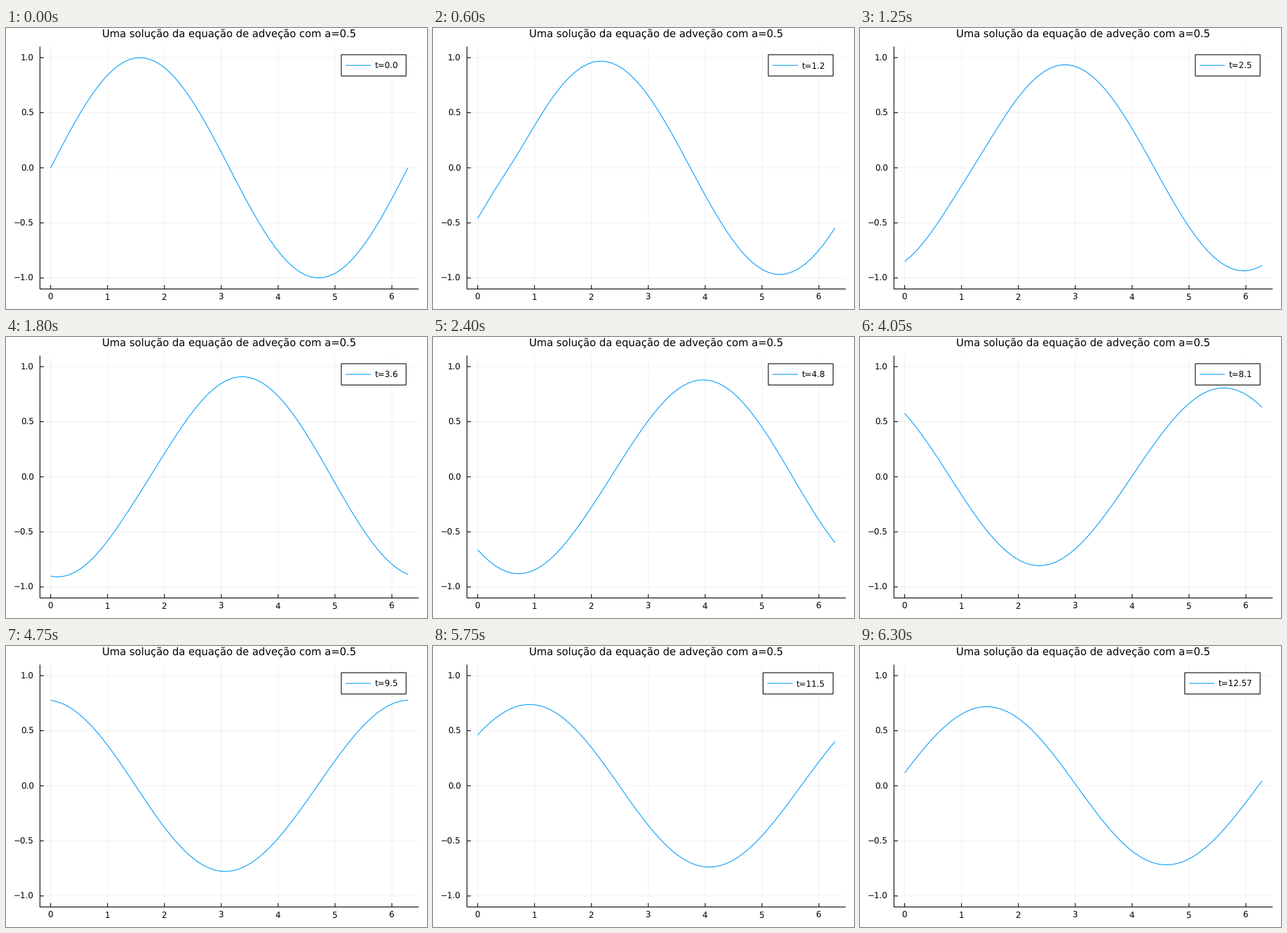
Write a matplotlib script that moves like this. It is 600 px wide and 400 px high and loops after 6350 ms.

```python
import numpy as np
import matplotlib.pyplot as plt
from matplotlib.animation import FuncAnimation
from matplotlib.patches import Rectangle

W, H, DPI = 600, 400, 100
PT = 72 / DPI
BLUE = "#009afa"
LEFT, RIGHT, TOP, BOTTOM = 48.4, 588.2, 26.5, 371.5
SMALL, LARGE = 11.85, 14.8

plt.rcParams["font.family"] = "DejaVu Sans"
plt.rcParams["text.hinting"] = "none"

# Upwind advection on a periodic grid, solved exactly in Fourier space
A, N = 0.5, 60
x = np.linspace(0, 2 * np.pi, N)
h = x[1]
spectrum = np.fft.fft(np.sin(x))
rates = -A / h * (1 - np.exp(-2j * np.pi * np.fft.fftfreq(N)))
times = np.append(np.arange(126) / 10, 4 * np.pi)


def solve(t):
    return np.fft.ifft(spectrum * np.exp(rates * t)).real


def to_x(v):
    pad = 0.03 * 2 * np.pi
    return LEFT + (v + pad) * (RIGHT - LEFT) / (2 * np.pi + 2 * pad)


def to_y(v):
    return (TOP + BOTTOM) / 2 - v * (BOTTOM - TOP) / 2.2


fig = plt.figure(figsize=(W / DPI, H / DPI), dpi=DPI, facecolor="white")
ax = fig.add_axes([0, 0, 1, 1])
ax.set(xlim=(0, W), ylim=(H, 0))
ax.axis("off")


def line(xs, ys, color="black", width=1.05, **kw):
    return ax.plot(xs, ys, color=color, lw=width * PT, snap=False,
                   solid_capstyle="butt", solid_joinstyle="miter", **kw)[0]


def label(px, py, text, size=SMALL, **kw):
    return ax.text(px, py, text, fontsize=size * PT, va="baseline", **kw)


for v in range(7):
    px = to_x(v)
    line([px, px], [TOP, BOTTOM], alpha=0.055, zorder=1)
    line([px, px], [BOTTOM, BOTTOM - 5.5])
    label(px - 0.6, 387, str(v), ha="center")

for v in (-1, -0.5, 0, 0.5, 1):
    py = to_y(v)
    line([LEFT, RIGHT], [py, py], alpha=0.055, zorder=1)
    line([LEFT, LEFT + 5.5], [py, py])
    label(39.9, py + 4.4, f"{v:.1f}".replace("-", "\u2212"), ha="right")

line([LEFT, LEFT, RIGHT], [TOP, BOTTOM, BOTTOM])
label((LEFT + RIGHT) / 2, 13, "Uma solução da equação de adveção com a=0.5",
      LARGE, ha="center")

curve = line(to_x(x), to_y(np.sin(x)), BLUE, zorder=3)
box = ax.add_patch(Rectangle((478, 38), 92.2, 30.3, fc="white", ec="black",
                             lw=1.05 * PT, snap=False, zorder=4))
key = line([484, 520], [53.2, 53.2], BLUE, zorder=5)
caption = label(525.5, 57.7, "", zorder=5)


def update(i):
    t = times[i]
    text = f"t={round(float(t), 2)}"
    start = 525.5 - (len(text) - 5) * 0.636 * SMALL
    curve.set_ydata(to_y(solve(t)))
    caption.set_text(text)
    caption.set_x(start)
    key.set_xdata([start - 41.5, start - 5.5])
    box.set_x(start - 47.6)
    box.set_width(570.2 - box.get_x())
    return curve, box, key, caption


anim = FuncAnimation(fig, update, frames=len(times), interval=50,
                     repeat=True, repeat_delay=0)
plt.show()
```
